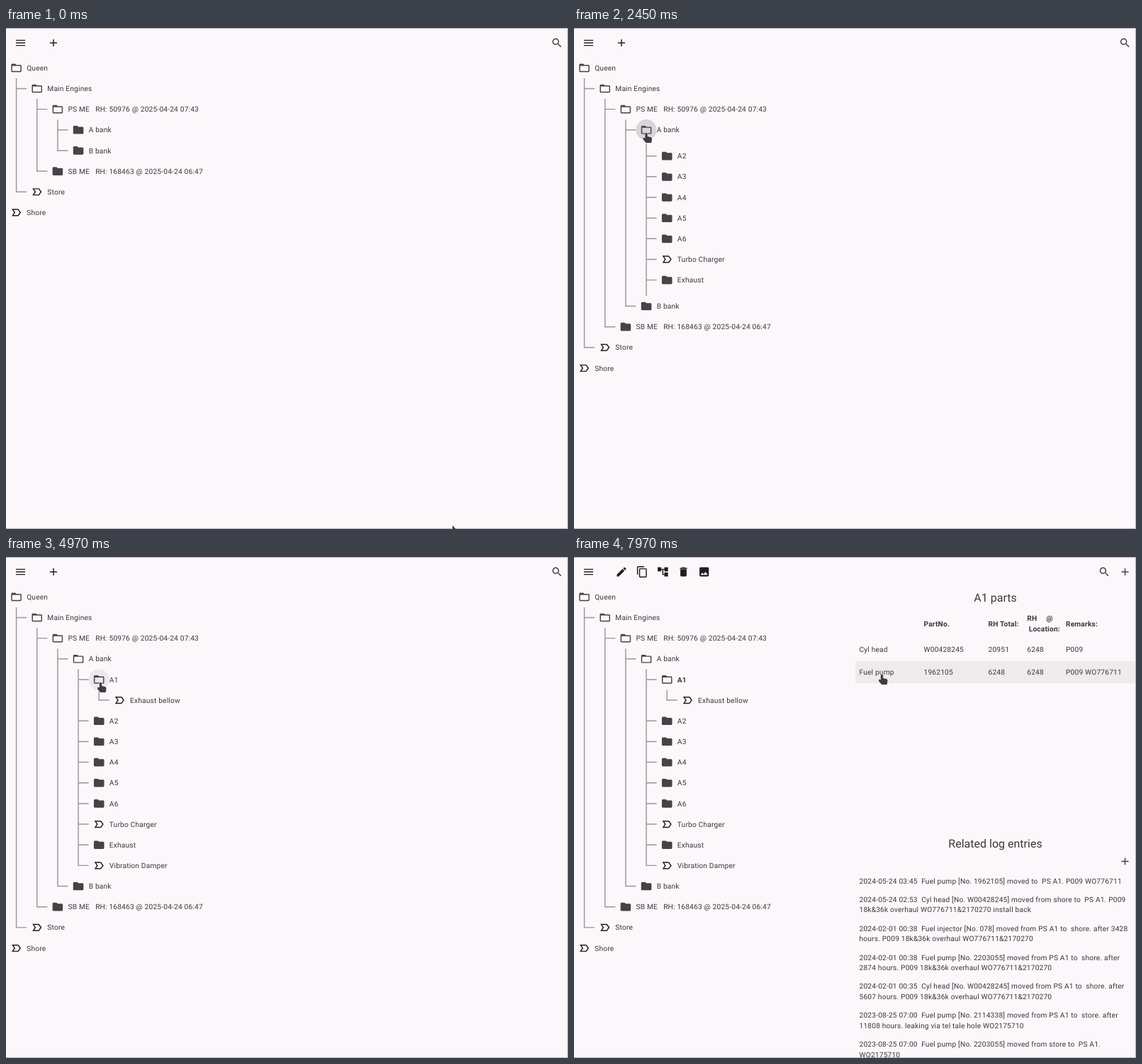
An HTML page with a canvas for the animation above (8 s loop, 793 by 707 pixels).

```html
<!DOCTYPE html>
<html lang="en">
<head>
<meta charset="utf-8">
<title>Parts tree</title>
<style>
  html, body { margin: 0; width: 100%; height: 100%; overflow: hidden; background: #fbf7fa; }
  canvas { display: block; width: 793px; height: 707px; }
</style>
</head>
<body>
<canvas id="stage"></canvas>
<script>
const W = 793, H = 707, LOOP = 8000, NEVER = 1e9;
const S = 0.729, ROW = 40 * S, HALF = ROW / 2;
const PAPER = '#fbf7fa', INK = '#3b383c', ICON = '#464246', DARK = '#201d21', LINE = '#99969a';
const BODY = 14 * S, TITLE = 22 * S;

const canvas = document.getElementById('stage');
const dpr = window.devicePixelRatio || 1;
canvas.width = W * dpr;
canvas.height = H * dpr;
const ctx = canvas.getContext('2d');

const shapes = {
  menu: 'M3 18h18v-2H3v2zm0-5h18v-2H3v2zm0-7v2h18V6H3z',
  add: 'M19 13h-6v6h-2v-6H5v-2h6V5h2v6h6v2z',
  search: 'M15.5 14h-.79l-.28-.27C15.41 12.59 16 11.11 16 9.5 16 5.91 13.09 3 9.5 3S3 5.91 3 9.5 5.91 16 9.5 16c1.61 0 3.09-.59 4.23-1.57l.27.28v.79l5 4.99L20.49 19l-4.99-5zm-6 0C7.01 14 5 11.99 5 9.5S7.01 5 9.5 5 14 7.01 14 9.5 11.99 14 9.5 14z',
  folder: 'M10 4H4c-1.1 0-1.99.9-1.99 2L2 18c0 1.1.9 2 2 2h16c1.1 0 2-.9 2-2V8c0-1.1-.9-2-2-2h-8l-2-2z',
  open: 'M20 6h-8l-2-2H4c-1.1 0-1.99.9-1.99 2L2 18c0 1.1.9 2 2 2h16c1.1 0 2-.9 2-2V8c0-1.1-.9-2-2-2zm0 12H4V8h16v10z',
  leaf: 'M15 19H3l4.5-7L3 5h12c.65 0 1.26.31 1.63.84L21 12l-4.37 6.16c-.37.52-.98.84-1.63.84zm-8.5-2H15l3.5-5L15 7H6.5l3.5 5-3.5 5z',
  edit: 'M3 17.25V21h3.75L17.81 9.94l-3.75-3.75L3 17.25zM20.71 7.04c.39-.39.39-1.02 0-1.41l-2.34-2.34c-.39-.39-1.02-.39-1.41 0l-1.83 1.83 3.75 3.75 1.83-1.83z',
  copy: 'M16 1H4c-1.1 0-2 .9-2 2v14h2V3h12V1zm3 4H8c-1.1 0-2 .9-2 2v14c0 1.1.9 2 2 2h11c1.1 0 2-.9 2-2V7c0-1.1-.9-2-2-2zm0 16H8V7h11v14z',
  tree: 'M22 11V3h-7v3H9V3H2v8h7V8h2v10h4v3h7v-8h-7v3h-2V8h2v3z',
  bin: 'M6 19c0 1.1.9 2 2 2h8c1.1 0 2-.9 2-2V7H6v12zM19 4h-3.5l-1-1h-5l-1 1H5v2h14V4z',
  image: 'M21 19V5c0-1.1-.9-2-2-2H5c-1.1 0-2 .9-2 2v14c0 1.1.9 2 2 2h14c1.1 0 2-.9 2-2zM8.5 13.5l2.5 3.01L14.5 12l4.5 6H5l3.5-4.5z',
  arrow: 'M0 0V15.5L3.6 12.2L6 17.6L8.6 16.5L6.2 11.3H11Z',
  hand: 'M-1.7 1Q0 -1.5 1.7 1V5L6.4 6Q8.2 6.6 8 8.6L7.2 14H-.4L-4.4 9.2Q-5.2 7.4 -3.4 6.6L-1.7 7.6Z'
};
for (const name in shapes) shapes[name] = new Path2D(shapes[name]);

// A tree node: its label, child nodes, and when it opens (ms).
const leaf = label => ({ label, leaf: true });
const node = (label, kids = [], opens = kids.length ? -LOOP : NEVER) => ({ label, kids, opens });

const a1 = node('A1', [leaf('Exhaust bellow')], 4430);
const aBank = node('A bank', [
  a1, ...[2, 3, 4, 5, 6].map(n => node('A' + n)),
  leaf('Turbo Charger'), node('Exhaust'), leaf('Vibration Damper')
], 2200);
const roots = [
  node('Queen', [
    node('Main Engines', [
      node('PS ME   RH: 50976 @ 2025-04-24 07:43', [aBank, node('B bank')]),
      node('SB ME   RH: 168463 @ 2025-04-24 06:47')
    ]),
    leaf('Store')
  ]),
  leaf('Shore')
];

const columns = [402.5, 493.5, 584.5, 639.3, 694];
const parts = [
  ['Cyl head', 'W00428245', '20951', '6248', 'P009'],
  ['Fuel pump', '1962105', '6248', '6248', 'P009 WO776711']
];
const logs = [
  ['2024-05-24 03:45  Fuel pump [No. 1962105] moved to  PS A1. P009 WO776711'],
  ['2024-05-24 02:53  Cyl head [No. W00428245] moved from shore to  PS A1. P009', '18k&36k overhaul WO776711&2170270 install back'],
  ['2024-02-01 00:38  Fuel injector [No. 078] moved from PS A1 to  shore. after 3428', 'hours. P009 18k&36k overhaul WO776711&2170270'],
  ['2024-02-01 00:38  Fuel pump [No. 2203055] moved from PS A1 to  shore. after', '2874 hours. P009 18k&36k overhaul WO776711&2170270'],
  ['2024-02-01 00:35  Cyl head [No. W00428245] moved from PS A1 to  shore. after', '5607 hours. P009 18k&36k overhaul WO776711&2170270'],
  ['2023-08-25 07:00  Fuel pump [No. 2114338] moved from PS A1 to  store. after', '11808 hours. leaking via tel tale hole WO2175710'],
  ['2023-08-25 07:00  Fuel pump [No. 2203055] moved from store to  PS A1.', 'WO2175710']
];

// Pointer stops: time, x, y.
const track = [
  [0, 630, 702], [40, 630, 702], [550, 268, 221], [1010, 268, 221], [1690, 102, 148],
  [2870, 102, 148], [3200, 134, 184], [3370, 134, 184], [3580, 132, 176],
  [4340, 132, 176], [4420, 133.5, 177], [4970, 133.5, 177], [5140, 141, 184],
  [5310, 149, 171], [7120, 149, 171], [7880, 432, 169], [7930, 432, 169], [7970, 434.5, 166], [LOOP, 434.5, 166]
];
const handTimes = [[1600, 2910], [3050, 5060], [5220, 7160]];
const PANEL = 5860, LISTS = 5930;

const ramp = (t, a, b) => Math.min(1, Math.max(0, (t - a) / (b - a)));
const ease = k => k * k * (3 - 2 * k);
const pulse = (t, a, b, c, d) => ramp(t, a, b) * (1 - ramp(t, c, d));

function pointerAt(t) {
  const i = Math.max(1, track.findIndex(p => p[0] > t));
  const [t0, x0, y0] = track[i - 1], [t1, x1, y1] = track[i];
  const k = ease(ramp(t, t0, t1));
  return { x: x0 + (x1 - x0) * k, y: y0 + (y1 - y0) * k };
}

function icon(name, x, y, color = DARK) {
  ctx.save();
  ctx.translate(x, y);
  ctx.scale(S, S);
  ctx.translate(-12, -12);
  ctx.fillStyle = color;
  ctx.fill(shapes[name]);
  ctx.restore();
}

// y is the middle of the text line.
function text(str, x, y, { size = BODY, weight = 400, align = 'left' } = {}) {
  ctx.font = `${weight} ${size}px Roboto, sans-serif`;
  ctx.letterSpacing = size === BODY ? 0.25 * S + 'px' : '0px';
  ctx.textAlign = align;
  ctx.fillStyle = INK;
  ctx.fillText(str, x, y + size * 0.355);
}

function stroke(x0, y0, x1, y1) {
  ctx.beginPath();
  ctx.moveTo(x0, y0);
  ctx.lineTo(x1, y1);
  ctx.stroke();
}

const openness = (n, t) => n.leaf ? 0 : ramp(t, n.opens, n.opens + 300);
const listHeight = (list, t) =>
  list.reduce((h, n) => h + ROW + (n.leaf ? 0 : openness(n, t) * listHeight(n.kids, t)), 0);

function drawList(list, depth, top, t) {
  const x = HALF + depth * ROW, lineX = x - ROW;
  let y = top, lastY = top;
  for (const n of list) {
    const mid = lastY = y + HALF;
    if (depth) stroke(lineX, mid, lineX + HALF, mid);
    const opened = !n.leaf && t >= n.opens;
    icon(n.leaf ? 'leaf' : opened ? 'open' : 'folder', x, mid, n.leaf ? DARK : ICON);
    text(n.label, x + HALF, mid, { weight: n === a1 && t >= PANEL ? 700 : 400 });
    y += ROW;
    if (opened) {
      // Children grow from the middle of their clipped block.
      const full = listHeight(n.kids, t), shown = full * openness(n, t);
      ctx.save();
      ctx.beginPath();
      ctx.rect(0, y, W, shown);
      ctx.clip();
      drawList(n.kids, depth + 1, y - (full - shown) / 2, t);
      ctx.restore();
      y += shown;
    }
  }
  if (depth) stroke(lineX, top, lineX, lastY + 0.7);
}

function disc(x, y, r, alpha) {
  if (alpha <= 0 || r <= 0) return;
  ctx.fillStyle = `rgba(60,52,60,${alpha})`;
  ctx.beginPath();
  ctx.arc(x, y, r, 0, 7);
  ctx.fill();
}

function drawInk(t) {
  const splash = (x, y, press) =>
    disc(x, y, 14.6 * ramp(t, press - 40, press + 160), 0.1 * pulse(t, press, press + 60, press + 350, press + 480));
  disc(102, 143.7, 14.6, 0.08 * pulse(t, 1580, 1660, 2870, 2960));
  splash(102, 143.7, 2110);
  disc(131.2, 172.9, 14.6, 0.08 * pulse(t, 3080, 3180, 5020, 5120));
  splash(131.2, 172.9, 4340);
  const label = 0.08 * pulse(t, 5210, 5290, 7120, 7200) + 0.06 * pulse(t, 5820, 5900, 6160, 6280);
  ctx.fillStyle = `rgba(60,52,60,${label})`;
  ctx.fillRect(146, 164.5, 13.5, 16);
}

function drawToolbar(t) {
  icon('menu', 20.5, 21);
  if (t < PANEL) {
    icon('add', 67, 21);
    icon('search', 777.5, 21, ICON);
    return;
  }
  ['edit', 'copy', 'tree', 'bin', 'image'].forEach((name, i) => icon(name, 67 + i * ROW, 21));
  icon('search', 748.3, 21, ICON);
  icon('add', 777.5, 21, ICON);
}

function drawPanel(t, pointer) {
  if (t < PANEL) return;
  text('A1 parts', 594.5, 57.3, { size: TITLE, align: 'center' });
  text('Related log entries', 594.5, 404.3, { size: TITLE, align: 'center' });
  icon('add', 777.5, 429.5, ICON);
  const bold = { weight: 700 };
  text('PartNo.', columns[1], 94, bold);
  text('RH Total:', columns[2], 94, bold);
  text('RH', columns[3], 86.7, bold);
  text('@', 666.5, 86.7, bold);
  text('Location:', 641.7, 101.3, bold);
  text('Remarks:', columns[4], 94, bold);
  if (t < LISTS) return;

  parts.forEach((cells, i) => {
    const y = 130.5 + i * 32;
    if (pointer.x >= 397 && Math.abs(pointer.y - y) < 16) {
      ctx.fillStyle = '#eeebed';
      ctx.fillRect(397, y - 15.7, 395, 31.5);
    }
    cells.forEach((cell, c) => text(cell, columns[c], y));
  });
  let y = 457;
  for (const lines of logs) {
    lines.forEach((line, i) => text(line, columns[0], y + i * 14.58));
    y += lines.length * 14.58 + 11.67;
  }
}

function drawPointer(t, { x, y }) {
  const hand = handTimes.some(([a, b]) => t >= a && t < b) || (t > LISTS && x >= 397);
  ctx.save();
  ctx.translate(x, y);
  ctx.lineWidth = 1.4;
  ctx.lineJoin = 'round';
  ctx.strokeStyle = '#f4f0f3';
  ctx.fillStyle = '#3f3b40';
  const path = shapes[hand ? 'hand' : 'arrow'];
  ctx.stroke(path);
  ctx.fill(path);
  ctx.restore();
}

function render(t) {
  const pointer = pointerAt(t);
  ctx.setTransform(dpr, 0, 0, dpr, 0, 0);
  ctx.textRendering = 'geometricPrecision';
  ctx.fillStyle = PAPER;
  ctx.fillRect(0, 0, W, H);
  ctx.strokeStyle = LINE;
  ctx.lineWidth = 2 * S;
  drawInk(t);
  drawList(roots, 0, 56.3 - HALF, t);
  drawToolbar(t);
  drawPanel(t, pointer);
  ctx.fillStyle = '#b3b1c0';
  ctx.fillRect(0, 0, W, 1);
  ctx.fillRect(W - 1, 0, 1, H);
  ctx.fillRect(0, H - 1, W, 1);
  drawPointer(t, pointer);
}

const start = performance.now();
function tick() {
  render((performance.now() - start) % LOOP);
  requestAnimationFrame(tick);
}
tick();
</script>
</body>
</html>
```
